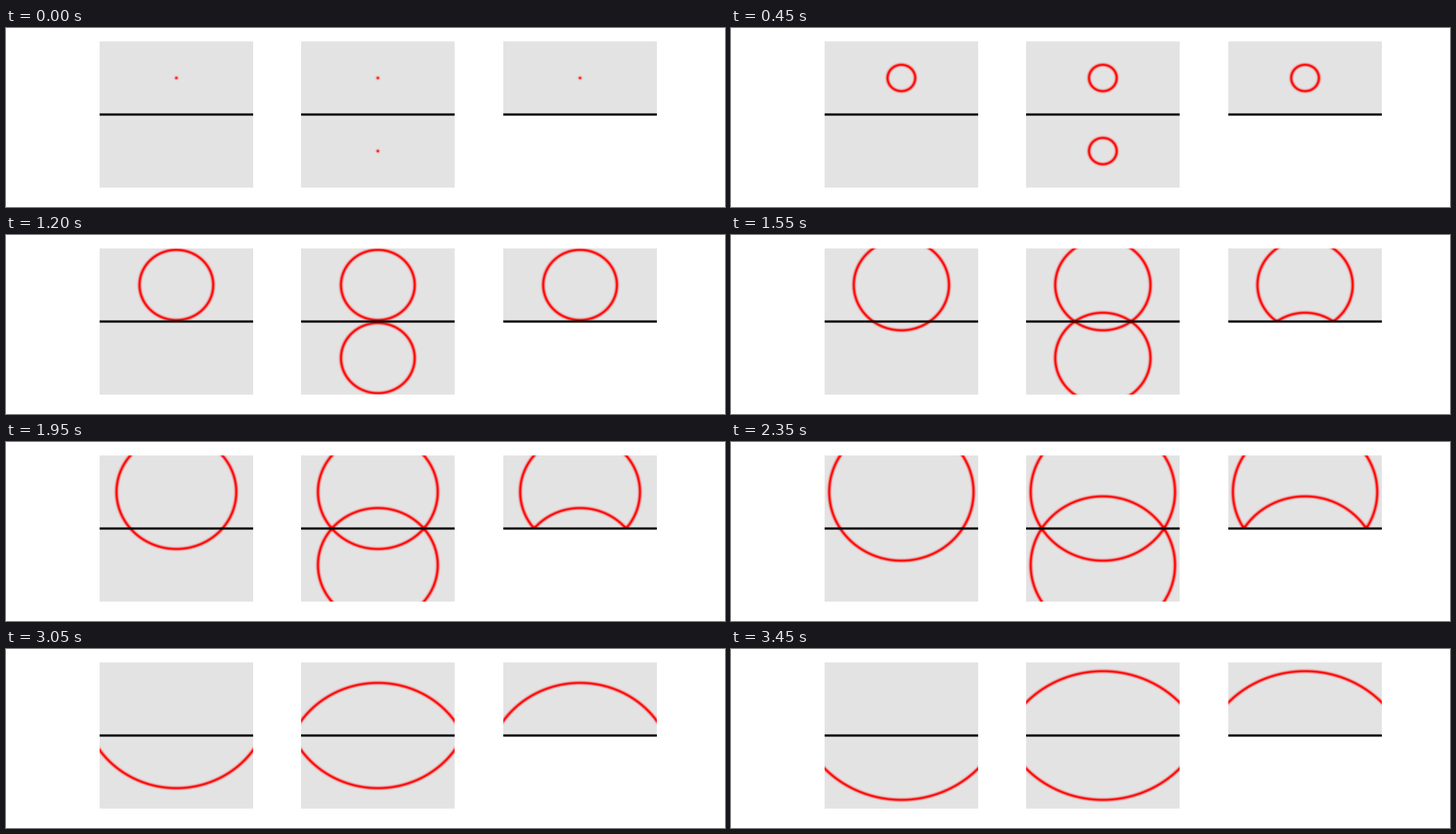
Recreate the animation shown at these times as a matplotlib script. Size 960x240 px, loop 3.5 s.

```python
import numpy as np
import matplotlib.pyplot as plt
from matplotlib.animation import FuncAnimation
from matplotlib.colors import LinearSegmentedColormap

STAGE_W, STAGE_H = 960, 240
PANEL_W, PANEL_H = 205, 196
TOP, WALL_Y = 18, 116
PANEL_X = (125, 394, 664)
FRAMES, INTERVAL = 70, 50
SPEED = 0.01   # radius gained per step, in panel widths
WIDTH = 0.01   # width of the pulse

# Pixel centres in units of the panel size, with y pointing down
x, y = np.meshgrid((np.arange(PANEL_W) + 0.5) / PANEL_W - 0.5,
                   (np.arange(PANEL_H) + 0.5) / PANEL_H)
dist_source = np.hypot(x, y - 0.25)
dist_mirror = np.hypot(x, y - 0.75)


def pulse(dist, radius):
    return np.exp(-((dist - radius) / WIDTH) ** 2)


def fields(step):
    """Free wave, wave plus mirror wave, and the reflected wave above the wall."""
    radius = SPEED * step
    free = pulse(dist_source, radius)
    both = free + pulse(dist_mirror, radius)
    return free, both, both[:WALL_Y - TOP]


fig = plt.figure(figsize=(STAGE_W / 100, STAGE_H / 100), dpi=100,
                 facecolor="white")
ax = fig.add_axes([0, 0, 1, 1])
cmap = LinearSegmentedColormap.from_list("wave", ["#e3e3e3", "#ff0000"])

images = []
for left, field in zip(PANEL_X, fields(0)):
    right = left + PANEL_W
    images.append(ax.imshow(
        field, cmap=cmap, vmin=0, vmax=1, aspect="auto",
        interpolation="nearest",
        extent=(left, right, TOP + field.shape[0], TOP)))
    ax.plot([left, right], [WALL_Y, WALL_Y], color="black",
            lw=3 * 72 / 100, solid_capstyle="butt", snap=False)

ax.set_xlim(0, STAGE_W)
ax.set_ylim(STAGE_H, 0)
ax.axis("off")


def update(step):
    for image, field in zip(images, fields(step)):
        image.set_data(field)
    return images


anim = FuncAnimation(fig, update, frames=FRAMES, interval=INTERVAL,
                     repeat=True, repeat_delay=0)
plt.show()
```
